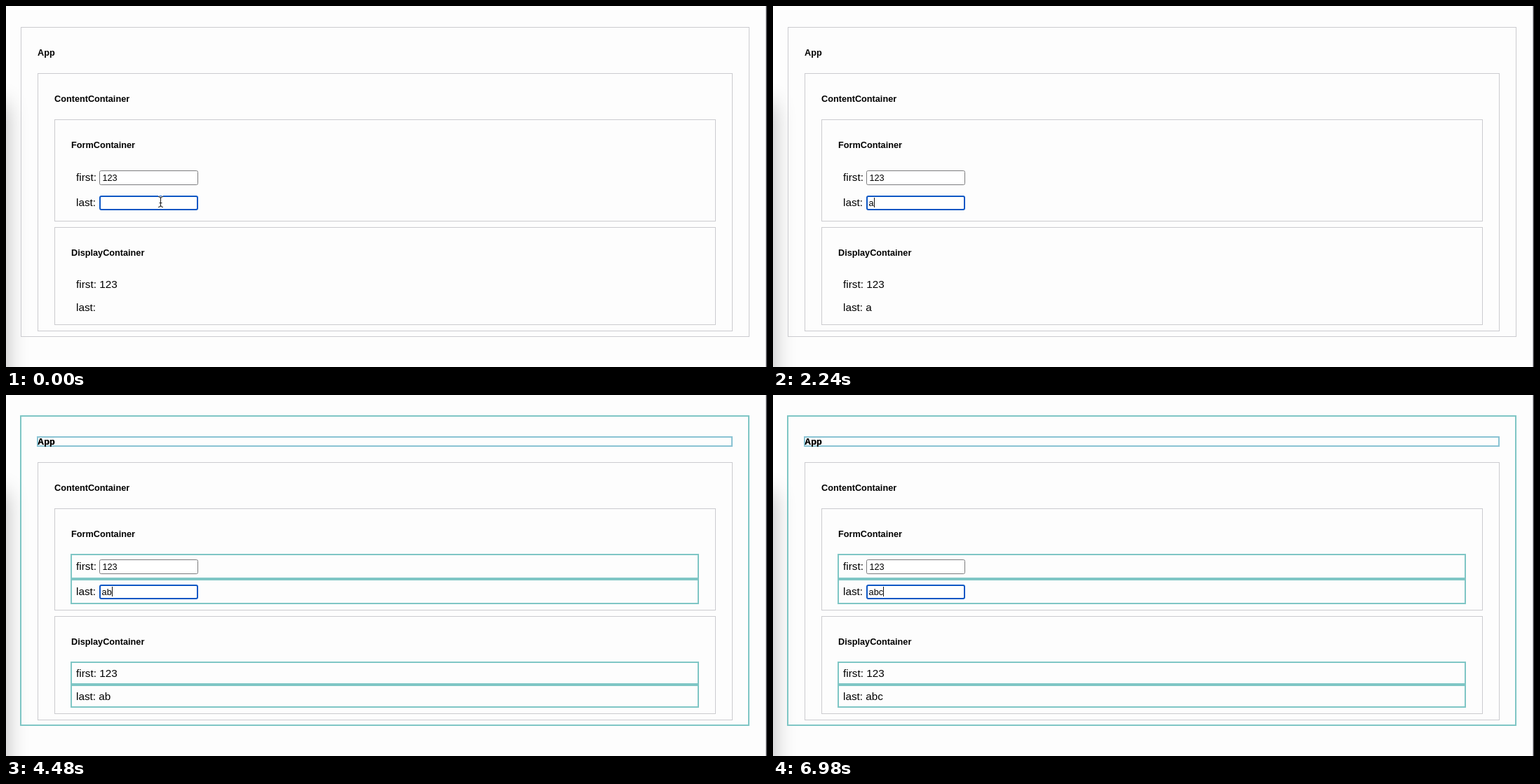
Animation of 1085x516 px, one loop 7.08 s. Source, as an HTML page with a canvas:

```html
<!DOCTYPE html>
<html lang="en">
<head>
<meta charset="utf-8">
<title>Render highlights</title>
<style>
  html, body { margin: 0; width: 100%; height: 100%; overflow: hidden; background: #fdfdfd; }
  canvas { display: block; }
</style>
</head>
<body>
<canvas id="stage" width="1085" height="516"></canvas>
<script>
const ctx = document.getElementById('stage').getContext('2d');
const W = 1085, H = 516, LOOP = 7080;
const FONT = '"Liberation Sans", Arial, sans-serif';
const BODY = '15.3px ' + FONT;
const FIELD = '12.73px ' + FONT;
const HEADING = 'bold 12.7px ' + FONT;

const KEYS = [
  { at: 1540, text: 'a' },
  { at: 4340, text: 'ab' },
  { at: 6860, text: 'abc' }
];
const FLASH = 570;      // how long the render outlines stay
const BLINK = 1130;     // half a caret period
const FIRST_CARET = 1120;

const panels = [
  ['App', 21, 30, 1060, 473],
  ['ContentContainer', 45, 96, 1036, 465],
  ['FormContainer', 69, 162, 1012, 308],
  ['DisplayContainer', 69, 316, 1012, 456]
];
const outlines = [
  [20, 29, 1060, 473],
  [92, 227, 988, 263],
  [92, 263, 988, 299],
  [92, 381, 988, 414],
  [92, 414, 988, 447]
];

function frame(x1, y1, x2, y2, color, width) {
  ctx.strokeStyle = color;
  ctx.lineWidth = width;
  ctx.strokeRect(x1 + width / 2, y1 + width / 2, x2 - x1 - width, y2 - y1 - width);
}

function label(text, x, y, font) {
  ctx.font = font;
  ctx.fillStyle = '#000';
  ctx.fillText(text, x, y);
}

function input(x, y, w, h, color, width) {
  ctx.beginPath();
  ctx.roundRect(x + width / 2, y + width / 2, w - width, h - width, 2);
  ctx.fillStyle = '#fff';
  ctx.fill();
  ctx.strokeStyle = color;
  ctx.lineWidth = width;
  ctx.stroke();
}

function backdrop() {
  ctx.fillStyle = '#fdfdfd';
  ctx.fillRect(0, 0, W, H);
  // soft shadow of a window beyond the left edge
  ctx.save();
  ctx.shadowColor = 'rgba(0, 0, 10, 0.3)';
  ctx.shadowBlur = 30;
  ctx.shadowOffsetX = 400;
  ctx.fillStyle = '#000';
  ctx.fillRect(-800, 140, 399, 600);
  ctx.restore();
  ctx.fillStyle = '#b4b4b6';
  ctx.fillRect(1083, 0, 1, H);
  ctx.fillStyle = '#34343a';
  ctx.fillRect(1084, 0, 1, H);
}

function pointer() {
  const path = new Path2D('M217 272.5Q220 272.5 220.5 275Q221 272.5 224 272.5' +
    'M220.5 274.5V285.5M217 287.5Q220 287.5 220.5 285Q221 287.5 224 287.5M218.5 281.5H222.5');
  ctx.strokeStyle = '#fff';
  ctx.lineWidth = 2.6;
  ctx.stroke(path);
  ctx.strokeStyle = '#222';
  ctx.lineWidth = 1.1;
  ctx.stroke(path);
}

function draw(t) {
  const key = KEYS.filter(k => k.at <= t).pop();
  const value = key ? key.text : '';
  const since = t - (key ? key.at : FIRST_CARET);

  backdrop();
  for (const [name, x1, y1, x2, y2] of panels) {
    frame(x1, y1, x2, y2, '#cbcbcf', 1);
    label(name, x1 + 24, y1 + 41, HEADING);
  }

  if (key && since < FLASH) {
    for (const box of outlines) frame(...box, '#7fc6c5', 2);
    frame(44, 59, 1036, 74, '#8ac3d3', 2);
    label('App', 45, 71, HEADING);
  }

  label('first:', 100, 249.5, BODY);
  label('last:', 100, 285.5, BODY);
  label('first: 123', 100, 403, BODY);
  label('last: ' + value, 100, 436, BODY);

  input(133, 235, 141, 21, '#7c7c7e', 1);
  label('123', 137.4, 249.5, FIELD);
  input(133, 271, 141, 21, '#0f57c4', 2);
  label(value, 136.6, 285.5, FIELD);

  if (since >= 0 && Math.floor(since / BLINK) % 2 === 0) {
    ctx.font = FIELD;
    const x = Math.round(136.9 + ctx.measureText(value).width);
    ctx.fillStyle = '#111';
    ctx.fillRect(x, 274, 1, 14);
  }
  if (!key) pointer();
}

const start = performance.now();
function tick() {
  draw((performance.now() - start) % LOOP);
  requestAnimationFrame(tick);
}
tick();
</script>
</body>
</html>
```
